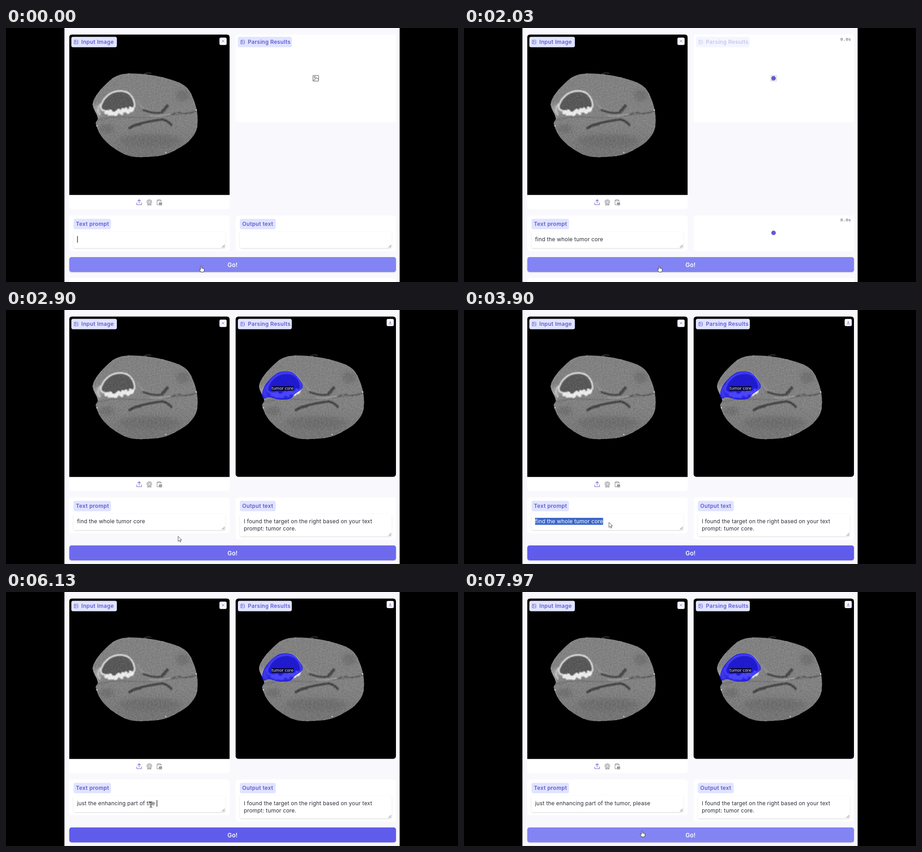
These frames come from a looping animation (998 px wide and 561 px high, 8 s). An HTML page:

```html
<!DOCTYPE html>
<html lang="en">
<head>
<meta charset="utf-8">
<title>Scan parsing demo</title>
<style>
html, body { margin: 0; width: 100%; height: 100%; overflow: hidden; background: #000; }
svg { display: block; width: 100vw; height: 100vh; }
text { font: 12px Inter, "Open Sans", sans-serif; letter-spacing: .17px; fill: #2b2d36; white-space: pre; }
.label { font-weight: 600; letter-spacing: .32px; fill: #635bd0; }
.go { font-size: 13px; font-weight: 600; fill: #fff; text-anchor: middle; }
.timer { font: 9.8px "Liberation Mono", monospace; letter-spacing: 0; fill: #4b5563; text-anchor: end; }
.mask { font: 8.7px "DejaVu Sans", sans-serif; letter-spacing: 0; fill: #e8e8e8; }
.icon { fill: none; stroke-width: 1; stroke-linecap: round; stroke-linejoin: round; }
</style>
</head>
<body>
<svg id="stage" viewBox="0 0 998 561"></svg>
<script>
const LOOP = 8000;
const PURPLE = '#635bd0', GRAY = '#81838c';
const LEFT = 139.7, RIGHT = 507, PANEL = 354, WIDE = 721.4;
const FIRST = 'find the whole tumor core';
const SECOND = 'just the enhancing part of the tumor, please';
const LOADING = 1940, REPLY = 2570, RESULT = 2700, SELECT = 3670, RETYPE = 4030;

// Bursts of typing: start, end, keys
const TYPE_FIRST = [[30, 530, 12], [670, 1370, 9], [1500, 1630, 4]];
const TYPE_SECOND = [[RETYPE, 4400, 9], [4570, 4800, 4], [5000, 5500, 13], [5900, 6870, 18]];
const CARET_ON = [[0, 1830], [3200, 3500], [RETYPE, 5670], [5900, 7380]];
const GO = [431, 526], FIELD = [320, 469], GO_AGAIN = [393, 528];

const rect = (x, y, w, h, fill, r = 0, more = '') =>
  `<rect x="${x}" y="${y}" width="${w}" height="${h}" rx="${r}" fill="${fill}" ${more}/>`;
const path = (d, more = '') => `<path d="${d}" ${more}/>`;
const line = (d, color, width, more = '') =>
  path(d, `fill="none" stroke="${color}" stroke-width="${width}" ${more}`);
const dot = (x, y, r, fill) => `<circle cx="${x}" cy="${y}" r="${r}" fill="${fill}"/>`;
const shade = (x, y, rx, ry, fill) =>
  `<ellipse cx="${x}" cy="${y}" rx="${rx}" ry="${ry}" fill="${fill}" opacity=".4"/>`;
const icon = (x, y, color, body, scale = 1) =>
  `<g class="icon" stroke="${color}" transform="translate(${x} ${y}) scale(${scale})">${body}</g>`;
const repeat = (n, draw) => Array.from({ length: n }, (_, i) => draw(i)).join('');

// Closed smooth curve through a few points
function blob(...pts) {
  const at = i => pts[(i + pts.length) % pts.length];
  return `M${pts[0]}` + pts.map((b, i) => {
    const a = at(i - 1), c = at(i + 1), e = at(i + 2);
    const c1 = b.map((v, j) => v + (c[j] - a[j]) / 6);
    const c2 = c.map((v, j) => v - (e[j] - b[j]) / 6);
    return `C${c1} ${c2} ${c}`;
  }).join('') + 'Z';
}

function seeded(seed) {
  return () => (seed = (seed * 16807) % 2147483647) / 2147483647;
}
const rnd = seeded(71);
const between = (a, b) => a + (b - a) * rnd();

const picture = rect(-4.5, -4.5, 9, 9, 'none', 1) + '<circle cx="-1.7" cy="-1.7" r="1"/><path d="M-4 3.8L1.4-.8L4.5 2"/>';
const label = (x, y, w, text, pic) =>
  rect(x, y, w, 23, '#e0e4ff', 4) +
  (pic ? icon(x + 10.5, y + 11.5, PURPLE, picture, .9) : '') +
  `<text class="label" x="${x + (pic ? 22 : 5)}" y="${y + 15.8}">${text}</text>`;
const grip = (x, y) => line(`M${x - 6} ${y}l6-6M${x - 2.5} ${y}l2.5-2.5`, '#555', 1);
const area = (x, more = '') => rect(x, 450, 335, 36, '#fff', 4, `filter="url(#shadow)" ${more}`);
const panel = (x, y, h, more) => rect(x, y, PANEL, h, '#fff', 6, more);

const BRAIN = blob([192, 171], [199, 150], [220, 125], [243, 107], [272, 101], [318, 104], [366, 115],
  [397, 130], [413, 156], [422, 190], [420, 225], [404, 249], [383, 264], [352, 279], [316, 284],
  [276, 283], [243, 268], [214, 243], [199, 213], [203, 198]);
const CORE = blob([213, 181], [212, 165], [228, 146], [251, 139], [272, 145], [283, 163], [280, 178], [248, 187]);
const MASK = blob([566, 187], [571, 169], [587, 149], [607, 137], [633, 139], [650, 157], [654, 172],
  [638, 185], [626, 196], [602, 197], [581, 192], [570, 195]);

// Short grooves scattered over the tissue
const groove = () => {
  const a = between(0, 6.283), k = between(.6, .95);
  const x = 309 + Math.cos(a) * 106 * k, y = 193 + Math.sin(a) * 84 * k;
  const tone = y > 200 ? '#505050' : '#9c9c9c';
  return line(`M${x} ${y}q${between(-3, 3)} 3 ${between(-2, 2)} ${between(4, 9)}`, tone, .9, 'opacity=".35"');
};
// Bright tissue heaped along the floor of the core
const clump = i => {
  const k = i / 25;
  return dot(221 + k * 58, 188 - k * k * 9 + between(-7, 5) * Math.sin(.5 + k * 2.1), between(2.5, 5), '#f4f4f4');
};

const scan = `<g id="scan">
  ${path(BRAIN, 'fill="url(#tissue)" stroke="#8a8a8a" stroke-width=".8"')}
  ${line(BRAIN, '#ccc', 1, 'stroke-dasharray="4 19 2 11 6 33" opacity=".6"')}
  <g clip-path="url(#brain)">
    <g filter="url(#soft)">
      ${shade(318, 249, 67, 15, '#5c5c5c')}
      ${shade(390, 149, 15, 13, '#555')}
      ${shade(222, 222, 17, 9, '#555')}
      ${shade(203, 181, 9, 12, '#f0f0f0')}
    </g>
    ${repeat(36, groove)}
    ${repeat(12, i => line(`M${258 + i * 9} ${between(236, 246)}q2 4 0 ${between(5, 11)}`, '#505050', 1.1, 'opacity=".4"'))}
    <g filter="url(#blur)" stroke-linecap="round">
      ${line('M203 204Q230 194 274 197T336 194Q378 194 420 183', '#585858', 1.1)}
      ${line('M290 160Q298 180 322 184T350 176', '#a0a0a0', 1.8)}
      ${line('M318 194Q339 196 362 190', '#a8a8a8', 2.2)}
      ${line('M367 191Q378 185 389 188T419 184', '#3a3a3a', 1.8, 'stroke-dasharray="9 4"')}
      ${line('M304 181Q325 190 345 186', '#444', 5)}
      ${line('M345 185Q350 180 356 172', '#444', 7)}
      ${line('M273 221Q282 214 297 212', '#404040', 6)}
      ${line('M290 213Q318 205 345 202Q357 204 365 214', '#404040', 5)}
    </g>
    <g filter="url(#blur)">
      ${path(CORE, 'fill="#565656" stroke="#e6e6e6" stroke-width="3.4"')}
      ${repeat(26, clump)}
      ${line('M209 167Q198 182 208 193', '#c8c8c8', 3)}
    </g>
    <rect x="190" y="98" width="236" height="190" filter="url(#grain)" opacity=".07"/>
  </g>
  ${dot(201, 216, 1.5, '#ddd')}${dot(420, 181, 1.6, '#ddd')}${dot(353, 275, 1.3, '#ddd')}
  ${line('M304 101l9-2 8 1', '#666', 1)}
</g>`;

document.getElementById('stage').innerHTML = `
<defs>
  <linearGradient id="tissue" x2="0" y2="1"><stop stop-color="#828282"/><stop offset=".6" stop-color="#838383"/><stop offset="1" stop-color="#747474"/></linearGradient>
  <clipPath id="brain">${path(BRAIN)}</clipPath>
  <filter id="blur"><feGaussianBlur stdDeviation=".8"/></filter>
  <filter id="soft" x="-20%" y="-20%" width="140%" height="140%"><feGaussianBlur stdDeviation="5"/></filter>
  <filter id="grain" x="0" y="0" width="1" height="1" color-interpolation-filters="sRGB">
    <feTurbulence type="fractalNoise" baseFrequency=".3" numOctaves="2" seed="4"/>
    <feColorMatrix values="2 0 0 0 -.5 2 0 0 0 -.5 2 0 0 0 -.5 0 0 0 0 1"/>
  </filter>
  <filter id="shadow" x="-5%" y="-20%" width="110%" height="150%"><feDropShadow dx="0" dy="1" stdDeviation="1.5" flood-opacity=".16"/></filter>
</defs>
${rect(0, 0, 998, 561, '#000')}
${rect(129, 0, 740, 561, '#f9f9fd')}
${line('M868.7 0V560.5H129', '#ccf5c4', 1)}

${panel(LEFT, 14.5, 385.5)}
${path(`M${LEFT} 368.7V20.5q0-6 6-6h${PANEL - 12}q6 0 6 6V368.7Z`)}
${scan}
${label(144.3, 19.5, 100.5, 'Input Image', true)}
${rect(471.3, 21.2, 15.8, 16.2, '#fff', 3)}
${icon(479.2, 29, PURPLE, '<path d="M-2.6-2.6L2.6 2.6M2.6-2.6L-2.6 2.6"/>', .95)}
${icon(294, 385, PURPLE, '<path d="M-5 1V5H5V1M0 2V-5.3M-3-2.5L0-5.5L3-2.5"/>', 1.05)}
${icon(316.5, 385, GRAY, '<circle cy="-.7" r="5"/><circle cy="-.7" r="2.5"/><path d="M-2.5 3.8L-4 5.7H4L2.5 3.8"/>', 1.05)}
${icon(338, 385, GRAY, '<path d="M-1 5.5H-4.5V-4.5H-2.5M2.5-4.5H4.5V-1M-2.3-6H2.3V-3.2H-2.3Z"/><rect x=".5" y="1" width="5.5" height="5" fill="#81838c"/><path d="M1.5 5L3.5 3L5 5" stroke="#fff"/>')}

<g id="empty">
  ${panel(RIGHT, 14.5, 193.5)}
  <g id="fade">
    ${label(512, 19.5, 119, 'Parsing Results', true)}
    ${icon(684, 111, GRAY, picture, 1.4)}
  </g>
</g>
<g id="result">
  ${rect(RIGHT, 14.5, PANEL, 354, '#000', 6)}
  <use href="#scan" x="367.4"/>
  ${path(MASK, 'fill="#0800ff" fill-opacity=".7" stroke="#2118ff" stroke-width="1"')}
  ${rect(586, 168, 49, 10.5, '#07071d', 1, 'opacity=".8"')}
  <text class="mask" x="586.5" y="176.2">tumor core</text>
  ${label(512, 19.5, 119, 'Parsing Results', true)}
  ${rect(840.5, 19.8, 15.6, 15.6, '#fff', 3)}
  ${icon(848.3, 27.7, PURPLE, '<path d="M-3.7 3.7H3.7M0-4V1.4M-2.4-.8L0 1.5L2.4-.8"/>', .9)}
</g>

${panel(LEFT, 414, 79)}
${label(149.2, 421.5, 82.5, 'Text prompt')}
${area(149.2)}
${rect(157, 459, 151, 15.5, '#3b66c9', 0, 'id="selection"')}
<text id="prompt" x="157" y="471"></text>
${rect(157, 459.5, 1.2, 14.5, '#111', 0, 'id="caret"')}
${grip(483, 485)}

${panel(RIGHT, 414, 79, 'id="outPanel"')}
<g id="output">
  ${label(516.5, 421.5, 79, 'Output text')}
  ${area(516.5, 'id="outArea"')}
  <g id="outGrip">${grip(850.5, 485)}</g>
  <g id="reply">
    <text x="525" y="470.7">I found the target on the right based on your text</text>
    <text x="525" y="486.7">prompt: tumor core.</text>
  </g>
</g>
<g id="loading">
  ${dot(683.5, 111, 5, PURPLE)}${dot(683.5, 452.5, 5, PURPLE)}
  <text class="timer" x="854.5" y="28"></text>
  <text class="timer" x="854.5" y="427"></text>
</g>
<g id="lower">
  ${rect(LEFT, 506, WIDE, 33, '#615beb', 5, 'id="button" filter="url(#shadow)"')}
  <text class="go" x="500.2" y="527.5">Go!</text>
  ${rect(LEFT, 552, WIDE, 20, '#fff', 5)}
</g>
<g id="pointer">
  ${path('M0 0V11.2L2.7 8.8L4.5 12.7L6.2 11.9L4.4 8.1H8Z', 'id="arrow" fill="#fff" stroke="#222" stroke-width=".8"')}
  ${line('M-3-5.3Q-.5-5.5 0-4.4Q.5-5.5 3-5.3M0-4.4V5.4M-3 6.2Q-.5 6.4 0 5.4Q.5 6.4 3 6.2M-1.5 1.5H1.5', '#111', 1.1, 'id="beam"')}
  ${path('M-1.2 7.5V.8Q-1.2-.4 0-.4T1.2 .8V4.6Q3 4 3.2 5Q4.8 4.6 5 5.6Q6.6 5.3 6.7 6.8V9.5L5.4 13H-.6L-3.9 8.1Q-4.3 6.8-3 6.5Q-2 6.6-1.2 7.5Z', 'id="hand" fill="#fff" stroke="#222" stroke-width=".9"')}
</g>`;

const $ = id => document.getElementById(id);
const show = (id, on) => $(id).setAttribute('display', on ? 'inline' : 'none');
const progress = (t, a, b) => Math.max(0, Math.min(1, (t - a) / (b - a)));
const ease = v => v * v * (3 - 2 * v);
const timers = document.querySelectorAll('.timer');

// The first key of a burst lands at its start, the last at its end
function typed(text, bursts, t) {
  const count = ([start, end, keys]) =>
    t < start ? 0 : 1 + Math.floor(progress(t, start, end) * (keys - 1) + .01);
  return text.slice(0, bursts.reduce((sum, burst) => sum + count(burst), 0));
}

function pointerAt(t) {
  const up = progress(t, 2690, 3250), down = ease(progress(t, 7050, 7560));
  const rise = 1 - (1 - up) ** 1.3;
  return GO.map((v, i) => v + (FIELD[i] - v) * rise + (GO_AGAIN[i] - FIELD[i]) * down);
}

function render(t) {
  const loading = t >= LOADING && t < REPLY;
  const replied = t >= REPLY;
  const shift = replied ? 14 : 0;
  const selected = t >= SELECT && t < RETYPE;

  show('empty', !replied);
  $('fade').setAttribute('opacity', loading ? .35 : 1);
  show('result', t >= RESULT);
  show('loading', loading);
  show('output', !loading);
  show('reply', replied);
  const tenths = Math.max(0, Math.floor((t - LOADING) / 100));
  timers.forEach(el => { el.textContent = `${(tenths / 10).toFixed(1)}s`; });

  $('outPanel').setAttribute('height', 79 + shift);
  $('outArea').setAttribute('height', 36 + shift);
  $('outGrip').setAttribute('transform', `translate(0 ${shift})`);
  $('lower').setAttribute('transform', `translate(0 ${shift})`);

  const prompt = $('prompt');
  prompt.textContent = t < RETYPE ? typed(FIRST, TYPE_FIRST, t) : typed(SECOND, TYPE_SECOND, t);
  prompt.style.fill = selected ? '#fff' : '';
  const width = prompt.textContent ? prompt.getComputedTextLength() : 0;
  show('selection', selected);
  $('selection').setAttribute('width', width);
  $('caret').setAttribute('x', 157.2 + width);
  show('caret', CARET_ON.some(([a, b]) => t >= a && t < b));

  const hover = 1 - ease(progress(t, 2815, 2965)) + ease(progress(t, 7430, 7630));
  const mix = (a, b) => Math.round(a + (b - a) * hover);
  $('button').setAttribute('fill', `rgb(${mix(97, 131)},${mix(91, 132)},${mix(235, 243)})`);

  const [x, y] = pointerAt(t);
  const onButton = y >= 506 + shift;
  const onArea = y >= 450 && y <= 486;
  $('pointer').setAttribute('transform', `translate(${x} ${y})`);
  show('hand', onButton);
  show('beam', onArea && !selected);
  show('arrow', !onButton && (!onArea || selected));
}

const began = performance.now();
function tick() {
  render((performance.now() - began) % LOOP);
  requestAnimationFrame(tick);
}
render(0);
requestAnimationFrame(tick);
</script>
</body>
</html>
```
